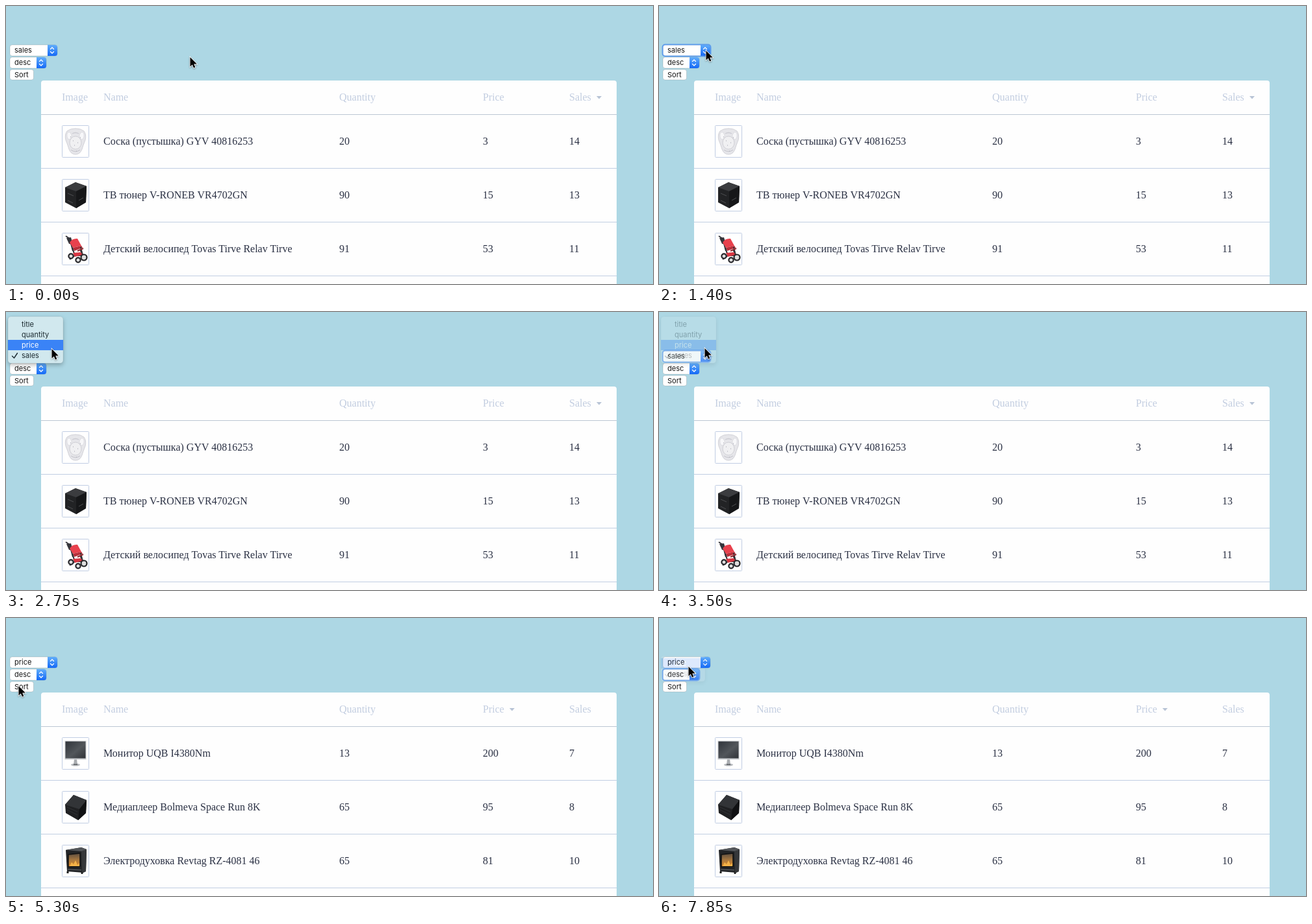
An HTML page for the animation above (8 s loop, 996x429 px).

```html
<!DOCTYPE html>
<html lang="ru">
<head>
<meta charset="utf-8">
<title>Sortable table</title>
<style>
  html, body { margin: 0; width: 100%; height: 100%; overflow: hidden; background: #add7e4; }
  svg { display: block; width: 996px; height: 429px; }
  text { white-space: pre; }
  .table text { font: 16px "Liberation Serif", "Times New Roman", serif; fill: #2b3144; }
  .table .head { fill: #c2cde0; }
  .ui text { font: 11px Inter, sans-serif; fill: #151515; }
  .box { fill: #fff; stroke: #000; stroke-opacity: .17; stroke-width: .8; }
  .ring { fill: none; stroke: #5396ee; stroke-width: 2; opacity: .85; }
  .chevron { fill: none; stroke: #fff; stroke-width: 1.3; stroke-linecap: round; stroke-linejoin: round; }
  .menu { filter: drop-shadow(0 3px 3px rgba(0, 0, 0, .25)); }
  .row text { fill: #1c2b31; }
  .row rect { fill: none; }
  .row path { fill: none; stroke: #1c2b31; stroke-width: 1.4; stroke-linecap: round; stroke-linejoin: round; }
  .row.on rect { fill: #3a83f6; }
  .row.on text { fill: #fff; }
  .row.on path { stroke: #fff; }
  #cursor { filter: drop-shadow(0 1px 1px rgba(0, 0, 0, .35)); }
</style>
</head>
<body>
<svg id="stage" viewBox="0 0 996 429">
  <defs>
    <linearGradient id="blue" x2="0" y2="1"><stop stop-color="#62aefa"/><stop offset="1" stop-color="#1469f7"/></linearGradient>
    <linearGradient id="screen" x2="1" y2="1"><stop stop-color="#30343a"/><stop offset=".55" stop-color="#52565b"/><stop offset="1" stop-color="#303338"/></linearGradient>
    <linearGradient id="fire" x2="0" y2="1"><stop stop-color="#5a4c40"/><stop offset=".5" stop-color="#a8783f"/><stop offset="1" stop-color="#e08a28"/></linearGradient>

    <!-- thumbnails, 42 by 50 each -->
    <g id="soother">
      <path d="M8 9Q13 5 21 5T34 9Q38 14 36 23Q33 30 31 37Q28 45 21 45T11 37Q9 30 6 23Q4 14 8 9Z" fill="#e6e6ea" stroke="#d2d2d8"/>
      <path d="M8 13q3-5 6 0t-2 9q-5 0-4-9zM34 13q-3-5-6 0t2 9q5 0 4-9z" fill="#f7f7f9" stroke="#d4d4da" stroke-width=".7"/>
      <ellipse cx="21" cy="27" rx="9" ry="10" fill="#f0f0f2" stroke="#d0d0d6"/>
      <path d="M14 38q7 5 14 0M16 13q5-3 10 0" fill="none" stroke="#cbcbd2" stroke-width="1.4"/>
      <path d="M17 24h1M24 27h1M19 31h1M13 18h1M28 19h1M22 40h1" stroke="#b9b9c2" stroke-width="1.6"/>
    </g>
    <g id="tuner">
      <path d="M5 13L21 5 38 11 37 36 22 45 5 36Z" fill="#222325"/>
      <path d="M5 13L21 5 38 11 22 19Z" fill="#3b3c3f"/>
      <path d="M22 19L38 11 37 36 22 45Z" fill="#161719"/>
      <path d="M9 22l9 4M9 33l8 4M26 33l7-4" stroke="#4d4e51"/>
    </g>
    <g id="trike">
      <path d="M6 5l6 4 5 19" fill="none" stroke="#33343a" stroke-width="2"/>
      <path d="M7 8l7-1 3 11-6-1z" fill="#34353b"/>
      <path d="M12 15Q16 8 24 9L30 20 17 23Z" fill="#e8414d"/>
      <path d="M17 23l13-3 2 3-13 5z" fill="#b82f3a"/>
      <path d="M16 23l4 12h12l-3-13M20 35l-8 6M28 26l6 11" fill="none" stroke="#2e2e33" stroke-width="2"/>
      <path d="M17 31l12-1 3 4-12 3z" fill="#d83642"/>
      <path d="M24 28l9-4M30 33l6 2" stroke="#922a31" stroke-width="2"/>
      <g fill="#ddd" stroke="#252529" stroke-width="2.2"><circle cx="34" cy="38" r="4.5"/><circle cx="14" cy="36" r="3.6"/><circle cx="25" cy="42" r="3.6"/></g>
    </g>
    <g id="monitor">
      <path d="M19 34h4l1 8h-6z" fill="#a9acb0"/>
      <ellipse cx="21" cy="42.500" rx="7" ry="2" fill="#b6b9bd"/>
      <path d="M18 42h6" stroke="#55585d" stroke-width="1.500"/>
      <rect x="4.500" y="5.500" width="33" height="29" fill="#c9ccd0"/>
      <rect x="5.500" y="6.500" width="31" height="26" fill="url(#screen)"/>
    </g>
    <g id="player">
      <path d="M5 21L18 6 38 14 37 34 25 45 6 34Z" fill="#1f2022"/>
      <path d="M5 21L18 6 38 14 27 28Z" fill="#323437"/>
      <path d="M27 28L38 14 37 34 25 45Z" fill="#101113"/>
      <path d="M8 25l16 7M8 29l16 8" stroke="#303235"/>
    </g>
    <g id="stove">
      <path d="M6 8L30 4 38 7 37 41 33 43 8 41Z" fill="#222427"/>
      <path d="M30 8l8-1-1 34-6 2z" fill="#35373a"/>
      <path d="M6 8L30 4l8 3-8 3z" fill="#53565a"/>
      <path d="M10 15l18-2v20l-18 1z" fill="url(#fire)" stroke="#111" stroke-width="1.500"/>
      <path d="M12 33l3-6 3 3 3-6 3 7 3-3v5z" fill="#f3b248"/>
      <path d="M9 38l21 1" stroke="#696b6e"/>
      <path d="M9 41v3M31 42v3" stroke="#222" stroke-width="3"/>
    </g>
  </defs>
</svg>
<script>
const stage = document.getElementById('stage');
const $ = id => document.getElementById(id);
const text = (x, y, s, attr = '') => `<text x="${x}" y="${y}" ${attr}>${s}</text>`;
const columns = [86, 150, 513, 734, 867];
const titles = ['Image', 'Name', 'Quantity', 'Price', 'Sales'];

function table(id, arrowX, rows) {
  const head = titles.map((s, i) => text(columns[i], 146, s, 'class="head"')).join('');
  const body = rows.map(([image, ...cells], i) => {
    const y = 168 + 83 * i;
    return `<rect x="86.5" y="${y + 16.5}" width="41" height="49" rx="1" fill="#fff" stroke="#c1cde3"/>
      <use href="#${image}" x="86" y="${y + 16}"/>
      <rect x="54" y="${y + 82}" width="886" height="1" fill="#c1cee2"/>` +
      cells.map((s, j) => text(columns[j + 1], y + 46, s)).join('');
  }).join('');
  return `<g id="${id}" class="table">
    <path d="M54 429V119a4 4 0 0 1 4-4H936a4 4 0 0 1 4 4V429Z" fill="#fefefe"/>
    <rect x="54" y="167" width="886" height="1" fill="#bcc6d2"/>
    ${head}<path d="M${arrowX} 139h8l-4 4.500z" fill="#b7c3d5"/>${body}</g>`;
}

function select(id, y, w, value) {
  const r = 6 + w, c = r - 8;
  return `<rect class="box" x="6" y="${y}" width="${w}" height="17" rx="3.500"/>
    <path d="M${r - 15} ${y}h11.500a3.500 3.500 0 0 1 3.500 3.500v10a3.500 3.500 0 0 1-3.500 3.500h-11.500z" fill="url(#blue)"/>
    <path class="chevron" d="M${c - 2.5} ${y + 6.5}l2.500-2.500 2.500 2.500M${c - 2.5} ${y + 10.5}l2.500 2.500 2.500-2.500"/>
    ${text(13, y + 12, value, `id="${id}Value"`)}
    <rect class="ring" id="${id}Ring" x="5.500" y="${y - 0.5}" width="${w + 1}" height="18" rx="4"/>`;
}

function menu(id, y, w, fill, items, checked) {
  const rows = items.map((s, i) => {
    const top = y + 4 + 16 * i;
    const check = i === checked ? `<path d="M9.500 ${top + 9}l3 3 5-7.500"/>` : '';
    return `<g class="row"><rect x="3" y="${top}" width="${w}" height="16"/>${check}${text(24, top + 12, s)}</g>`;
  }).join('');
  return `<g id="${id}" class="menu"><rect x="3" y="${y}" width="${w}" height="${items.length * 16 + 8}" rx="4.500"
    fill="${fill}" stroke="#000" stroke-opacity=".12" stroke-width=".6"/>${rows}</g>`;
}

stage.insertAdjacentHTML('beforeend',
  table('bySales', 909, [
    ['soother', 'Соска (пустышка) GYV 40816253', 20, 3, 14],
    ['tuner', 'ТВ тюнер V-RONEB VR4702GN', 90, 15, 13],
    ['trike', 'Детский велосипед Tovas Tirve Relav Tirve', 91, 53, 11]
  ]) +
  table('byPrice', 775, [
    ['monitor', 'Монитор UQB I4380Nm', 13, 200, 7],
    ['player', 'Медиаплеер Bolmeva Space Run 8K', 65, 95, 8],
    ['stove', 'Электродуховка Revtag RZ-4081 46', 65, 81, 10]
  ]) +
  `<g class="ui">${select('field', 60, 73, 'sales')}${select('order', 79, 56, 'desc')}
    <rect class="box" x="6" y="98" width="36.500" height="16" rx="3.500"/>${text(13, 110, 'Sort')}
    ${menu('fieldMenu', 7, 85, '#d1e8ee', ['title', 'quantity', 'price', 'sales'], 3)}
    ${menu('orderMenu', 58, 68, '#dee8f0', ['asc', 'desc'], 1)}</g>
  <path id="cursor" d="M0 0V14.500L3.300 11.400 5.500 16.500 7.800 15.500 5.700 10.600H10.300Z" stroke="#fff" stroke-width="1.600" paint-order="stroke"/>`);

// time, x, y
const path = [
  [350, 283.5, 79], [1400, 72.5, 69], [2450, 72.5, 69], [2750, 70.5, 57], [2900, 70.5, 56],
  [3800, 70.5, 56], [4400, 17, 114], [4700, 19.5, 105], [6050, 19.5, 105], [6500, 49.5, 82.5],
  [7100, 49.5, 82.5], [7400, 45.5, 75]
];

function cursorAt(t) {
  const i = path.findIndex(p => p[0] >= t);
  if (i < 0) return path[path.length - 1].slice(1);
  if (i === 0) return path[0].slice(1);
  const [t0, x0, y0] = path[i - 1], [t1, x1, y1] = path[i];
  const u = (t - t0) / (t1 - t0), k = u * u * (3 - 2 * u);
  return [x0 + (x1 - x0) * k, y0 + (y1 - y0) * k];
}

const show = (id, on) => { $(id).style.display = on ? '' : 'none'; };

function setMenu(id, opacity, active) {
  show(id, opacity > 0);
  $(id).style.opacity = opacity;
  $(id).querySelectorAll('.row').forEach((row, i) => row.classList.toggle('on', i === active));
}

function render(t) {
  t = Math.max(0, Math.floor((t - 50) / 150) * 150 + 50);
  const sorted = t >= 5300;
  show('bySales', !sorted);
  show('byPrice', sorted);
  show('fieldRing', t >= 1400 && !sorted);
  show('orderRing', t >= 6800);
  $('fieldValue').textContent = t < 3650 ? 'sales' : 'price';
  // the chosen row blinks off once before its menu fades
  setMenu('fieldMenu', t < 2150 || t >= 3650 ? 0 : t < 3500 ? 1 : .3,
    t < 2750 ? 3 : t === 3350 ? -1 : 2);
  setMenu('orderMenu', t < 6800 ? 0 : t < 7850 ? 1 : .17,
    t < 7400 ? 1 : t === 7700 ? -1 : 0);
  const [x, y] = cursorAt(t);
  $('cursor').setAttribute('transform', `translate(${x} ${y})`);
}

const start = performance.now();
function loop() {
  render((performance.now() - start) % 8000);
  requestAnimationFrame(loop);
}
loop();
</script>
</body>
</html>
```
